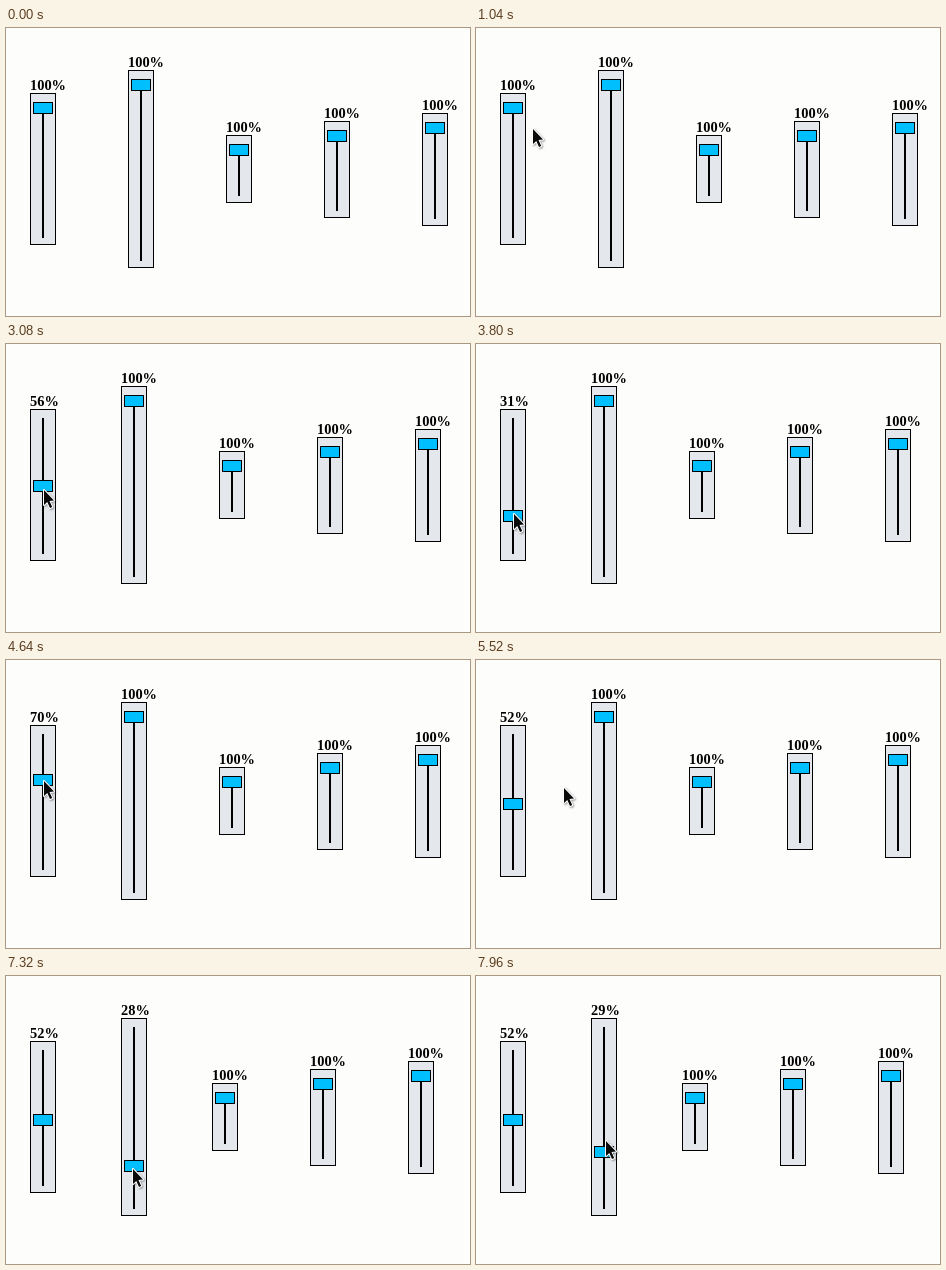
These frames come from a looping animation (464 px wide and 288 px high, 8 s). An HTML page with a canvas:

```html
<!DOCTYPE html>
<html lang="en">
<head>
<meta charset="utf-8">
<title>Vertical sliders</title>
<style>
  html, body { margin: 0; width: 100%; height: 100%; overflow: hidden; background: #fdfdfc; }
  canvas { display: block; }
</style>
</head>
<body>
<canvas id="stage" width="464" height="288"></canvas>
<script>
const ctx = document.getElementById('stage').getContext('2d');
const LOOP = 8000, STEP = 40;
const BOX_WIDTH = 26, GAP = 62, MIDDLE = 141;
const COLORS = { page: '#fdfdfc', box: '#e4e8ec', thumb: '#00bfff', ink: '#000' };

// Track lengths, and the times between which a slider is dragged.
const sliders = [
  { track: 136, from: 2440, to: 5320 },
  { track: 182, from: 6280, to: LOOP },
  { track: 52 },
  { track: 81 },
  { track: 97 }
];

// Key points of the pointer; equal neighbours are rests.
const point = (time, x, y) => ({ time, x, y });
const path = [
  point(720, 79, 258), point(1040, 57, 101), point(1240, 37, 84),
  point(2480, 37, 84), point(2520, 37, 91), point(3640, 38, 172),
  point(3760, 38, 172), point(3800, 38, 170), point(4560, 38, 120),
  point(5240, 38, 144), point(5360, 38, 144),
  point(5520, 88, 128), point(5840, 122, 126), point(6240, 122, 126),
  point(6680, 122, 138), point(6720, 122, 142),
  point(7680, 130, 206), point(7880, 130, 185), point(7960, 130, 165)
];
const LAST = path.length - 1;

const clamp = (v, lo, hi) => Math.max(lo, Math.min(hi, v));

function slope(i, axis) {
  const a = path[clamp(i, 0, LAST - 1)], b = path[clamp(i, 0, LAST - 1) + 1];
  return (b[axis] - a[axis]) / (b.time - a.time);
}

// Harmonic mean of the slopes on both sides, so the curve never overshoots.
function tangent(i, axis) {
  const a = slope(i - 1, axis), b = slope(i, axis);
  return a * b > 0 ? 2 * a * b / (a + b) : 0;
}

function pointer(time) {
  const t = clamp(time, path[0].time, path[LAST].time);
  const i = clamp(path.findIndex(p => p.time > t) - 1, -1, LAST - 1);
  const k = i < 0 ? LAST - 1 : i;
  const a = path[k], b = path[k + 1];
  const span = b.time - a.time, u = (t - a.time) / span;
  const along = axis => Math.round(
    a[axis] + (b[axis] - a[axis]) * u * u * (3 - 2 * u)
    + span * u * (1 - u) * ((1 - u) * tangent(k, axis) - u * tangent(k + 1, axis)));
  return { x: along('x'), y: along('y') };
}

function fillRect(x, y, w, h, color) {
  ctx.fillStyle = color;
  ctx.fillRect(x, y, w, h);
}

function framedRect(x, y, w, h, color) {
  fillRect(x, y, w, h, COLORS.ink);
  fillRect(x + 1, y + 1, w - 2, h - 2, color);
}

// Draws one slider at x and returns the width of its column.
function drawSlider({ track, from, to }, x, t) {
  const height = track + 16;
  const top = Math.floor(MIDDLE + 0.5 - height / 2);
  const start = top + 15, range = track - 2;
  const held = time => t >= from
    ? clamp(pointer(Math.min(time, to)).y, start, start + range)
    : start;
  // The thumb trails the pointer, and the label trails the thumb.
  const thumb = held(t - STEP);
  const value = 1 - (held(t - 2 * STEP) - start) / range;
  const label = Math.round(value * 100) + '%';

  framedRect(x, top, BOX_WIDTH, height, COLORS.box);
  fillRect(x + 12, top + 9, 2, track, COLORS.ink);
  framedRect(x + 3, thumb - 6, 20, 12, COLORS.thumb);
  ctx.fillStyle = COLORS.ink;
  ctx.fillText(label, x, top - 3);
  return Math.max(BOX_WIDTH, Math.round(ctx.measureText(label).width));
}

function drawPointer({ x, y }) {
  const arrow = new Path2D(
    `M${x} ${y} v15 l3.3 -3 l2.7 6 l2.2 -1 l-2.7 -6 l4.5 -.5 z`);
  ctx.save();
  ctx.lineJoin = 'round';
  ctx.shadowColor = 'rgba(60, 60, 60, 0.5)';
  ctx.shadowBlur = 2;
  ctx.shadowOffsetX = ctx.shadowOffsetY = 1;
  ctx.strokeStyle = '#fff';
  ctx.lineWidth = 2;
  ctx.stroke(arrow);
  ctx.restore();
  ctx.fillStyle = '#0a0a0a';
  ctx.fill(arrow);
}

function draw(now) {
  const t = Math.floor(now % LOOP / STEP) * STEP;
  fillRect(0, 0, 464, 288, COLORS.page);
  ctx.font = 'bold 14.4px "Liberation Serif", serif';
  let x = 24;
  for (const slider of sliders) x += drawSlider(slider, x, t) + GAP;
  if (t >= path[0].time) drawPointer(pointer(t));
}

let begin;
function tick(now) {
  begin ??= now;
  draw(Math.max(0, now - begin));
  requestAnimationFrame(tick);
}
draw(0);
requestAnimationFrame(tick);
</script>
</body>
</html>
```
